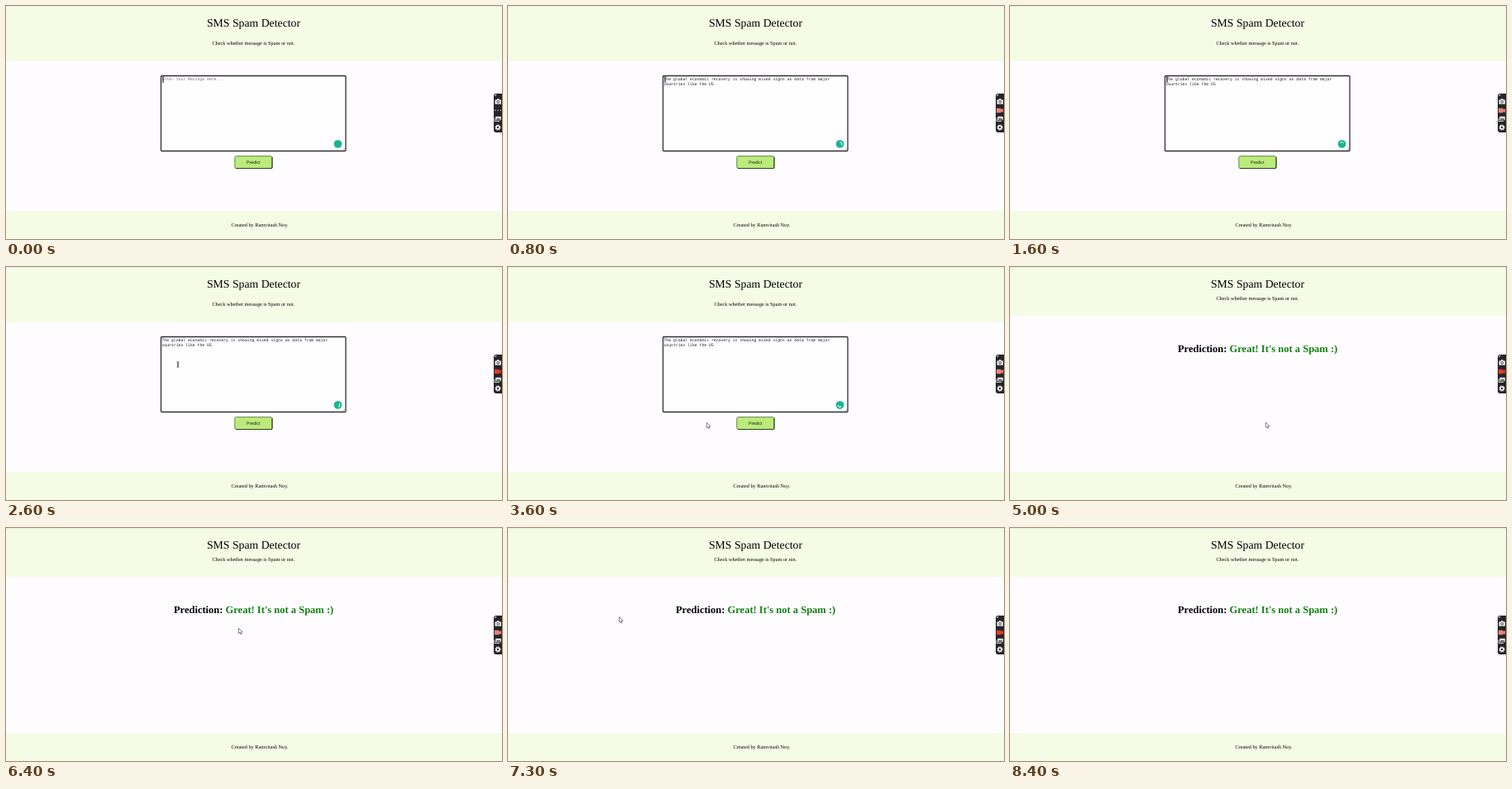
An HTML page that plays this animation: 600 px wide and 282 px high, repeating every 8.5 s.

```html
<!DOCTYPE html>
<html lang="en">
<head>
<meta charset="utf-8">
<title>SMS Spam Detector</title>
<style>
  html, body { margin: 0; width: 100%; height: 100%; overflow: hidden; background: #fefcff; }
  svg { display: block; width: 600px; height: 282px; }
  text { text-rendering: geometricPrecision; white-space: pre; }
  .serif { font-family: "Liberation Serif", "Times New Roman", serif; text-anchor: middle; }
  .small { font-size: 6.25px; }
  .mono { font: 4.77px "DejaVu Sans Mono", monospace; }
</style>
</head>
<body>
<svg viewBox="0 0 600 282">
  <rect width="600" height="282" fill="#fefcff"/>
  <rect id="header" width="600" height="66.5" fill="#f4fce5"/>
  <rect width="600" height="1" fill="#e6eee3"/>
  <rect y="248" width="600" height="34" fill="#f4fce5"/>
  <text class="serif" x="299.5" y="25" font-size="13.75">SMS Spam Detector</text>
  <text id="subtitle" class="serif small" x="299.3" y="47">Check whether message is Spam or not.</text>
  <text class="serif small" x="307" y="267.3">Created by Ramvitash Noy.</text>

  <g id="form">
    <rect x="187.5" y="84.5" width="223.5" height="91" rx="1" fill="#fefdff" stroke="#303030" stroke-width="1.3"/>
    <path d="M407.5 174.5l2.5-2.5M409 174.5l1-1" stroke="#777" stroke-width=".5"/>
    <text id="hint" class="mono" x="188.5" y="90.3" fill="#757575">Enter Your Message Here...</text>
    <g id="message" class="mono" fill="#222">
      <text x="188.5" y="90.3">The global economic recovery is showing mixed signs as data from major</text>
      <text x="188.5" y="96.3">countries like the US</text>
    </g>
    <path id="caret" d="M249.3 91.5v6" stroke="#222" stroke-width=".6"/>
    <circle cx="401.5" cy="167" r="4.8" fill="#13b78e"/>
    <path id="spinner" d="M399.5 165.7a2.4 2.4 0 0 1 4 0" fill="none" stroke="#fff" stroke-width="1" stroke-linecap="round"/>
    <rect x="276.8" y="181.7" width="45.2" height="14.8" rx="1.8" fill="#bcea7b" stroke="#5c7a42" stroke-width=".9"/>
    <path d="M278 196.5h42.5q1.5 0 1.5-1.5v-12" fill="none" stroke="#2d3c24" stroke-width="1.1"/>
    <text x="299.2" y="190.6" text-anchor="middle" fill="#172010" font-size="5.3" font-family="Liberation Sans, Arial, sans-serif">Predict</text>
  </g>

  <text id="result" class="serif" x="299.6" y="103" font-size="12.5" font-weight="bold">Prediction: <tspan fill="#118011">Great! It's not a Spam :)</tspan></text>

  <path d="M600 106h-7q-3 0-3 3v41q0 3 3 3h7z" fill="#252527"/>
  <path d="M591.5 107.2h2.3l-2.3 2.3z" fill="#eee"/>
  <g fill="#eee">
    <path d="M591.5 113.5h2l.7-1.2h2l.7 1.2h2v5.3h-7.4z"/>
    <circle cx="595.2" cy="116" r="1.7" fill="#252527"/>
    <circle cx="595.2" cy="116" r="1"/>
    <g id="dots"><circle cx="591.8" cy="126.3" r=".7"/><circle cx="595" cy="126.3" r=".7"/><circle cx="598.2" cy="126.3" r=".7"/></g>
    <path d="M591 135.5v4h6" fill="none" stroke="#eee" stroke-width=".8"/>
    <rect x="592.3" y="133.8" width="6.5" height="4.5" rx=".5"/>
    <path d="M593 137.6l1.7-2 1.2 1.2 1-1 1.4 1.8z" fill="#252527"/>
    <circle cx="595" cy="147" r="2.9" fill="none" stroke="#eee" stroke-width="1.4" stroke-dasharray="1.3 .978"/>
    <circle cx="595" cy="147" r="1.9" fill="none" stroke="#eee" stroke-width="1.5"/>
  </g>
  <path id="record" d="M591.6 123.8h4.4q.7 0 .7.7v1l2.4-1.4v5l-2.4-1.4v.9q0 .7-.7.7h-4.4q-.7 0-.7-.7v-4.1q0-.7.7-.7z"/>

  <path id="beam" d="M-1.5-3.3q1.5 0 1.5.8v5q0 .8-1.5.8M1.5-3.3q-1.5 0-1.5.8v5q0 .8 1.5.8" fill="none" stroke="#222" stroke-width=".7"/>
  <path id="arrow" d="M0 0v6.2l1.5-1.2 1 2.3 1.1-.5-1-2.2 2-.1z" fill="#fff" stroke="#333" stroke-width=".6"/>
</svg>
<script>
const LOOP = 8500, PASTE = 400, SUBMIT = 4900;
const $ = id => document.getElementById(id);
const show = (id, on) => $(id).setAttribute("visibility", on ? "visible" : "hidden");

// Pointer path: time, x, y
const path = [
  [0, 190, 89], [1600, 190, 89], [2100, 208, 118], [3000, 208, 118],
  [3400, 181, 165], [3700, 270, 200], [3900, 300, 191], [4100, 309.3, 188],
  [5600, 309.3, 188], [6400, 281.5, 121.5], [6500, 227, 121.5],
  [7400, 123, 106], [7600, 41, 62], [7900, 0, 3]
];

function pointer(t) {
  const i = path.findIndex(p => p[0] > t);
  if (i < 0) return path[path.length - 1].slice(1);
  const [t0, x0, y0] = path[i - 1], [t1, x1, y1] = path[i];
  const k = (t - t0) / (t1 - t0);
  return [x0 + (x1 - x0) * k, y0 + (y1 - y0) * k];
}

function draw(now) {
  const t = Math.floor(now % LOOP / 100) * 100;
  const pasted = t >= PASTE, done = t >= SUBMIT;

  show("form", !done);
  show("result", done);
  show("hint", !pasted);
  show("message", pasted && !done);
  show("caret", pasted && !done && t % 1000 < 500);
  show("spinner", pasted && !done);
  $("spinner").setAttribute("transform", `rotate(${(t - 1600) * .82} 401.5 167)`);
  $("header").setAttribute("height", done ? 59 : 66.5);
  $("subtitle").setAttribute("y", done ? 40 : 47);

  show("dots", !pasted);
  show("record", pasted);
  $("record").setAttribute("fill", (t + 400) % 800 < 450 ? "#ee8378" : "#e5392d");

  const [x, y] = pointer(t);
  const typing = !done && x > 187 && x < 411 && y > 84 && y < 176;
  const inside = t < 7700 || t === 7900;
  show("beam", typing);
  show("arrow", !typing && inside);
  for (const id of ["beam", "arrow"]) $(id).setAttribute("transform", `translate(${x} ${y})`);
}

let start;
function tick(now) {
  start ??= now;
  draw(Math.max(0, now - start));
  requestAnimationFrame(tick);
}
draw(0);
requestAnimationFrame(tick);
</script>
</body>
</html>
```
